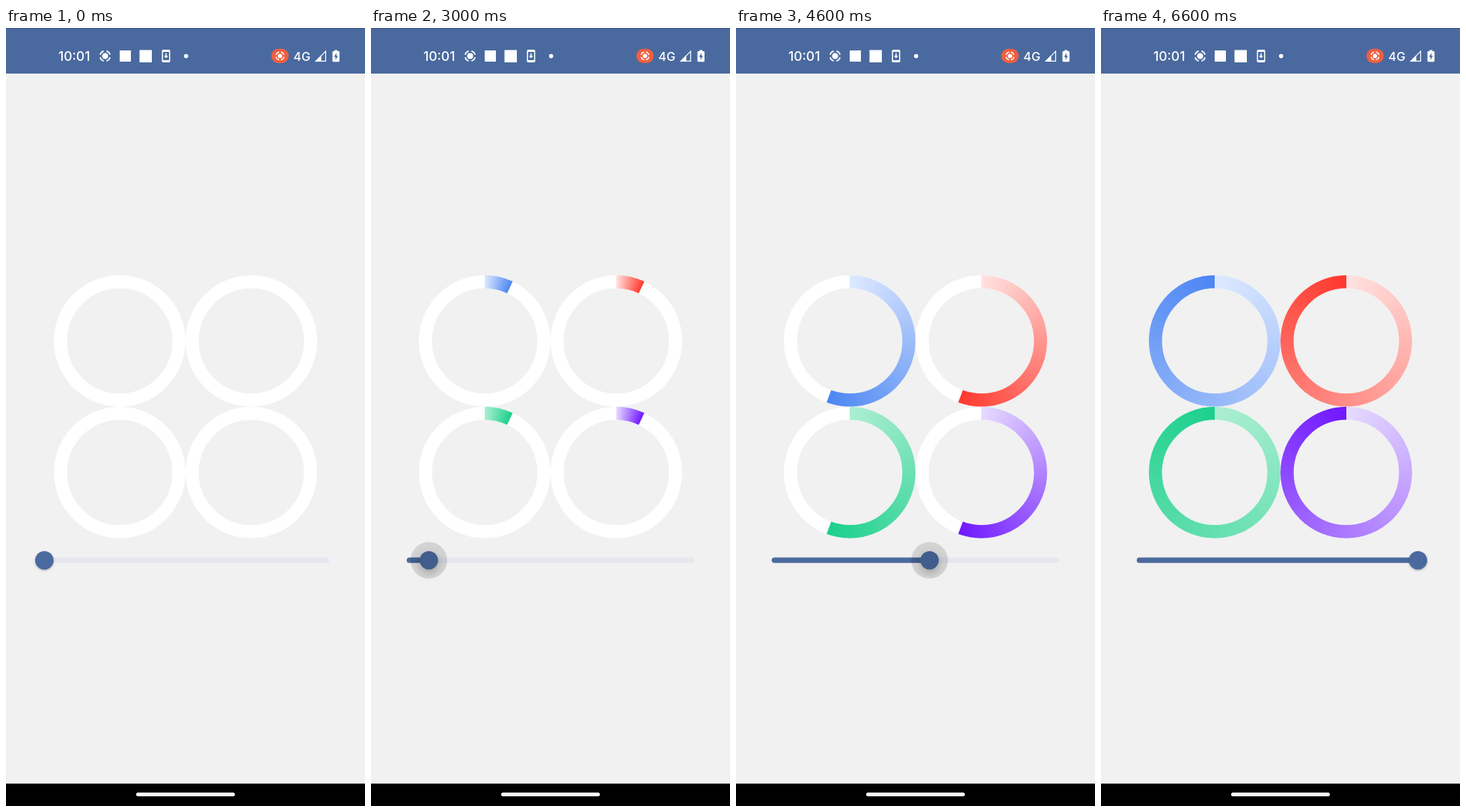
An HTML page with a canvas that plays this animation: 480 px wide and 1041 px high, repeating every 8000 ms.

```html
<!DOCTYPE html>
<html lang="en">
<head>
<meta charset="utf-8">
<title>Progress rings</title>
<style>
  html, body { margin: 0; width: 100%; height: 100%; overflow: hidden; background: #f1f1f1; }
  svg, canvas { position: absolute; left: 0; top: 0; width: 480px; height: 1041px; }
  text { font-family: Inter, Roboto, sans-serif; font-weight: 500; fill: #fff; }
</style>
</head>
<body>
<canvas id="stage"></canvas>
<svg viewBox="0 0 480 1041" fill="#fff">
  <rect width="480" height="61" fill="#4a6a9f"/>
  <rect width="480" height="1" fill="#3a547f"/>
  <text x="70" y="43.7" font-size="17.5">10:01</text>

  <g id="rec" transform="translate(132.5 37.5)">
    <circle r="4"/>
    <circle r="6.9" fill="none" stroke="#fff" stroke-width="1.7" pathLength="80"
      stroke-dasharray="13 7" stroke-dashoffset="-3.5"/>
  </g>
  <rect x="152" y="30" width="15" height="15"/>
  <rect x="178.5" y="29.5" width="16.5" height="16.5"/>

  <rect x="208.5" y="29" width="11" height="17" rx="1.8"/>
  <rect x="210" y="32" width="8" height="11" fill="#4a6a9f"/>
  <path d="M213.2 33.8h1.6v3.4h2.2l-3 3.4-3-3.4h2.2z"/>
  <circle cx="240.8" cy="37.6" r="2.8"/>

  <rect x="354.8" y="27.8" width="23.2" height="19.2" rx="9.6" fill="#ef5f41"/>
  <circle cx="366.4" cy="37.4" r="2.9"/>
  <circle cx="366.4" cy="37.4" r="5.4" fill="none" stroke="#fff" stroke-width="1.4"
    pathLength="80" stroke-dasharray="14 6" stroke-dashoffset="-3"/>

  <text x="384.3" y="43.5" font-size="16.2">4G</text>
  <path d="M414.4 44.4H427.4V31.2Z" fill="none" stroke="#fff" stroke-width="1.2"/>
  <path d="M413 45H421.5V36.5Z"/>
  <path d="M439.3 29.5h3.8v1.6h1.6q1.2 0 1.2 1.2v11.8q0 1.2-1.2 1.2h-7q-1.2 0-1.2-1.2v-11.8q0-1.2 1.2-1.2h1.6z"/>
  <path d="M441.8 33.2l-3.2 5.6h2v4.2l3.2-5.8h-2z" fill="#4a6a9f"/>

  <rect y="1011" width="480" height="30"/>
  <rect y="1011" width="480" height="30" fill="#000"/>
  <rect x="174" y="1023" width="132" height="5" rx="2.5"/>
</svg>
<script>
const LOOP = 8000, STEP = 100, PRESS = 2100, RELEASE = 6600;
const BLUE = '#4a6a9f';
// time in ms, slider value
const KEYS = [
  [2500, 0], [2800, 0.03], [3100, 0.09], [3300, 0.147], [3400, 0.19], [3500, 0.257],
  [4200, 0.442], [5100, 0.701], [5600, 0.862], [6100, 0.951], [6300, 0.982], [6500, 1]
];
// centre, pale colour, full colour
const RINGS = [
  [152, 418.7, '#dde9ff', '#4d86f3'],
  [328, 418.7, '#ffe2e0', '#ff392e'],
  [152, 594.7, '#adeed3', '#1cd08c'],
  [328, 594.7, '#e6daff', '#7018ff']
];

const canvas = document.getElementById('stage');
const ctx = canvas.getContext('2d');
const dpr = window.devicePixelRatio || 1;
canvas.width = 480 * dpr;
canvas.height = 1041 * dpr;
ctx.scale(dpr, dpr);

function valueAt(t) {
  const i = KEYS.findIndex(k => k[0] >= t);
  if (i === 0) return 0;
  if (i < 0) return 1;
  const [t0, v0] = KEYS[i - 1], [t1, v1] = KEYS[i];
  return v0 + (v1 - v0) * (t - t0) / (t1 - t0);
}

function disc(x, y, r, color) {
  ctx.fillStyle = color;
  ctx.beginPath();
  ctx.arc(x, y, r, 0, 2 * Math.PI);
  ctx.fill();
}

function arc(x, y, part, style) {
  const top = -Math.PI / 2;
  ctx.strokeStyle = style;
  ctx.lineWidth = 17.6;
  ctx.beginPath();
  ctx.arc(x, y, 79.2, top, top + part * 2 * Math.PI);
  ctx.stroke();
}

function ring([x, y, pale, full], value) {
  arc(x, y, 1, '#fff');
  if (!value) return;
  const sweep = ctx.createConicGradient(-Math.PI / 2, x, y);
  sweep.addColorStop(0, pale);
  sweep.addColorStop(value, full);
  arc(x, y, value, sweep);
}

function bar(x0, x1, color) {
  ctx.fillStyle = color;
  ctx.beginPath();
  ctx.roundRect(x0, 708.6, x1 - x0, 7.2, 3.6);
  ctx.fill();
}

function slider(value, pressed) {
  const x = 51.3 + 372.5 * value, y = 712.2;
  bar(47.8, 432.2, '#e6e6f0');
  if (value) bar(47.8, x, BLUE);
  ctx.save();
  ctx.shadowColor = pressed ? 'rgba(0,0,0,.25)' : 'rgba(0,0,0,.3)';
  ctx.shadowBlur = (pressed ? 12 : 3) * dpr;
  ctx.shadowOffsetY = (pressed ? 4 : 1) * dpr;
  disc(x, y, 12.3, BLUE);
  ctx.restore();
  if (pressed) disc(x, y, 24.5, 'rgba(0,0,0,.12)');
}

function draw() {
  const t = Math.floor(performance.now() % LOOP / STEP) * STEP;
  const value = valueAt(t);
  ctx.clearRect(0, 0, 480, 1041);
  RINGS.forEach(r => ring(r, value));
  slider(value, t >= PRESS && t < RELEASE);
  requestAnimationFrame(draw);
}
draw();
</script>
</body>
</html>
```
